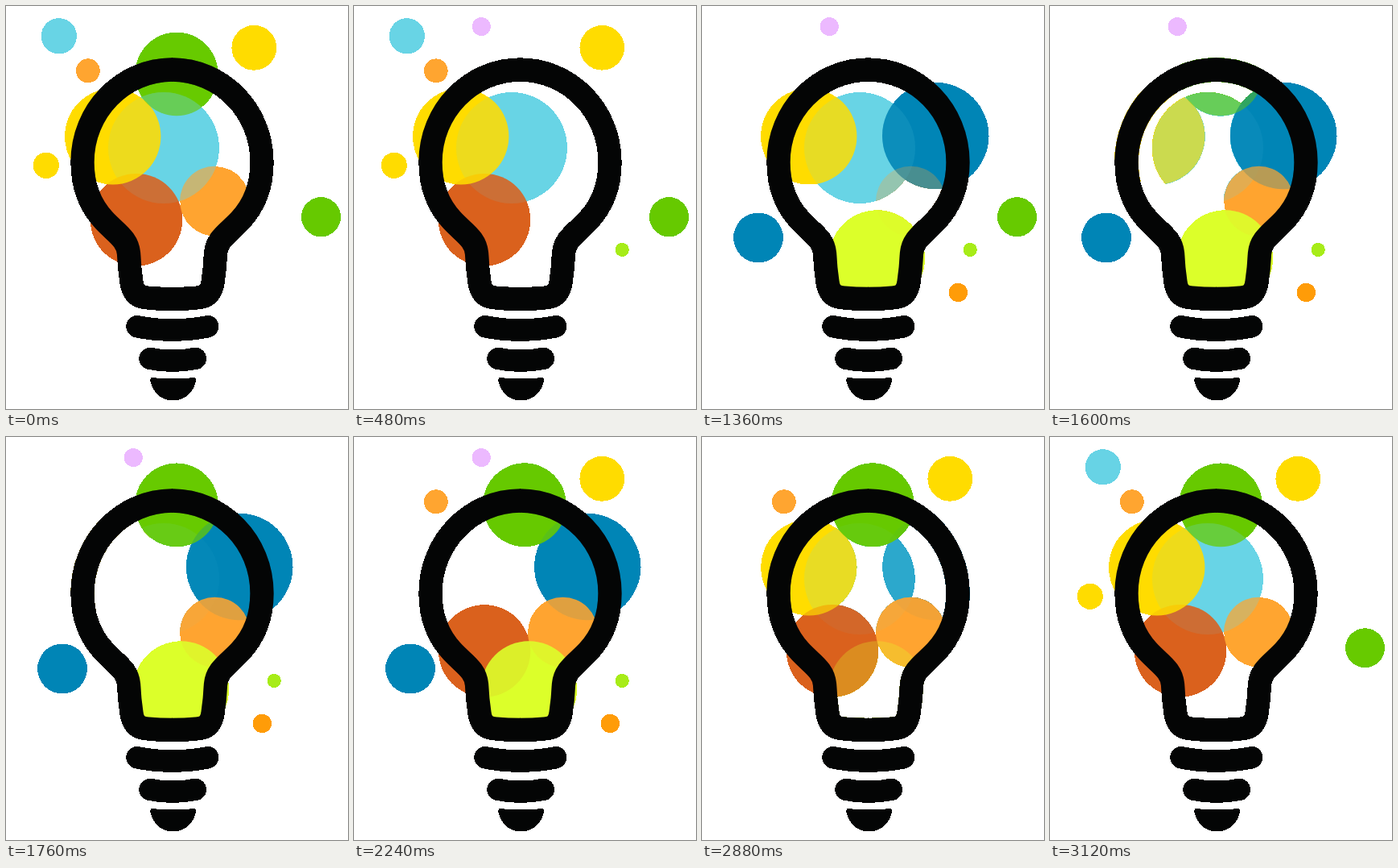
An HTML page with a canvas that plays this animation: 425x500 px, repeating every 3200 ms.

```html
<!DOCTYPE html>
<html lang="en">
<head>
<meta charset="utf-8">
<title>Light bulb with bubbles</title>
<style>
html, body { margin: 0; width: 100%; height: 100%; overflow: hidden; background: #fff; }
canvas { display: block; }
</style>
</head>
<body>
<canvas width="425" height="500"></canvas>
<script>
const LOOP = 3200, STEP = 80, FADE_IN = 480, FADE_OUT = 640, PEAK = 0.86;
const W = 425, H = 500, AXIS = 206.5;
const ctx = document.querySelector('canvas').getContext('2d', { willReadFrequently: true });

const cyan = '#68d4e6', yellow = '#ffdd00', orange = '#ffa530',
      green = '#67ca00', blue = '#0085b6';

// x, y, radius, colour, middle of fade-in, middle of fade-out (ms); back to front
const bubbles = [
  [196, 176, 69, cyan, 2920, 1640],
  [290.3, 161, 66.3, blue, 720, 2800],
  [162, 265.3, 57.3, '#da611e', 2100, 880],
  [259.5, 242.3, 43.5, orange, 1460, 115],
  [132.7, 161.8, 59.7, yellow, 2755, 1640],
  [212, 84.3, 52, green, 1600, 115],
  [217.5, 313, 59.7, '#dcff2a', 1120, 2740],
  [65.8, 37.2, 22.2, cyan, 2900, 1280],
  [158.3, 25.5, 11.6, '#ecb9ff', 280, 2600],
  [101.8, 80.3, 15, orange, 2000, 720],
  [308.3, 51.8, 28, yellow, 2000, 720],
  [49.8, 197.8, 16.2, yellow, 2960, 720],
  [391.5, 261.7, 24.6, green, 2960, 1640],
  [333.2, 302.4, 8.7, '#a6ec18', 280, 2600],
  [70, 287.5, 31, blue, 720, 2800],
  [318.3, 355.4, 11.7, '#ff9c08', 1060, 2830]
];

const glassHalf = new Path2D('M207 79 C145 79 95 130 95 194 C95 227 106 249 122 266 ' +
  'C137 282 151 289 152.5 307 C153 318 154 330 156 343 C158 356 164 361 176 362 Q190 363.5 207 363.5');
const threads = new Path2D('M162.9 397.7 Q206.5 406.3 250.7 397.7 M179 437.4 Q206.5 443.2 235.3 437.4');
const tip = new Path2D('M182 461 Q207 464 233 461 Q237 461 236 466 C232 481 221 489.5 207.5 489.5 ' +
  'C194 489.5 183 481 179.5 466 Q178.5 461 182 461Z');

const wrap = t => (t % LOOP + LOOP) % LOOP;

function opacity(t, on, off) {
  const begin = on - FADE_IN / 2, end = off + FADE_OUT / 2;
  const age = wrap(t - begin), left = wrap(end - begin) - age;
  return PEAK * Math.max(0, Math.min(1, age / FADE_IN, left / FADE_OUT));
}

function drawBulb() {
  ctx.strokeStyle = ctx.fillStyle = '#040505';
  ctx.lineWidth = 29.3;
  ctx.lineCap = 'butt';
  ctx.stroke(glassHalf);
  ctx.save();
  ctx.transform(-1, 0, 0, 1, 2 * AXIS, 0);
  ctx.stroke(glassHalf);
  ctx.restore();
  ctx.lineWidth = 27.4;
  ctx.lineCap = 'round';
  ctx.stroke(threads);
  ctx.fill(tip);
}

// Every pixel becomes fully opaque or fully clear
function hardenAlpha() {
  const image = ctx.getImageData(0, 0, W, H), px = image.data;
  for (let i = 3; i < px.length; i += 4) px[i] = px[i] < 128 ? 0 : 255;
  ctx.putImageData(image, 0, 0);
}

function draw(t) {
  ctx.clearRect(0, 0, W, H);
  for (const [x, y, r, colour, on, off] of bubbles) {
    ctx.globalAlpha = opacity(t, on, off);
    ctx.fillStyle = colour;
    ctx.beginPath();
    ctx.arc(x, y, r, 0, 2 * Math.PI);
    ctx.fill();
  }
  ctx.globalAlpha = 1;
  drawBulb();
  hardenAlpha();
}

const start = performance.now();
let shown = -1;
function tick() {
  const step = Math.floor(wrap(performance.now() - start) / STEP);
  if (step !== shown) draw((shown = step) * STEP);
  requestAnimationFrame(tick);
}
tick();
</script>
</body>
</html>
```
